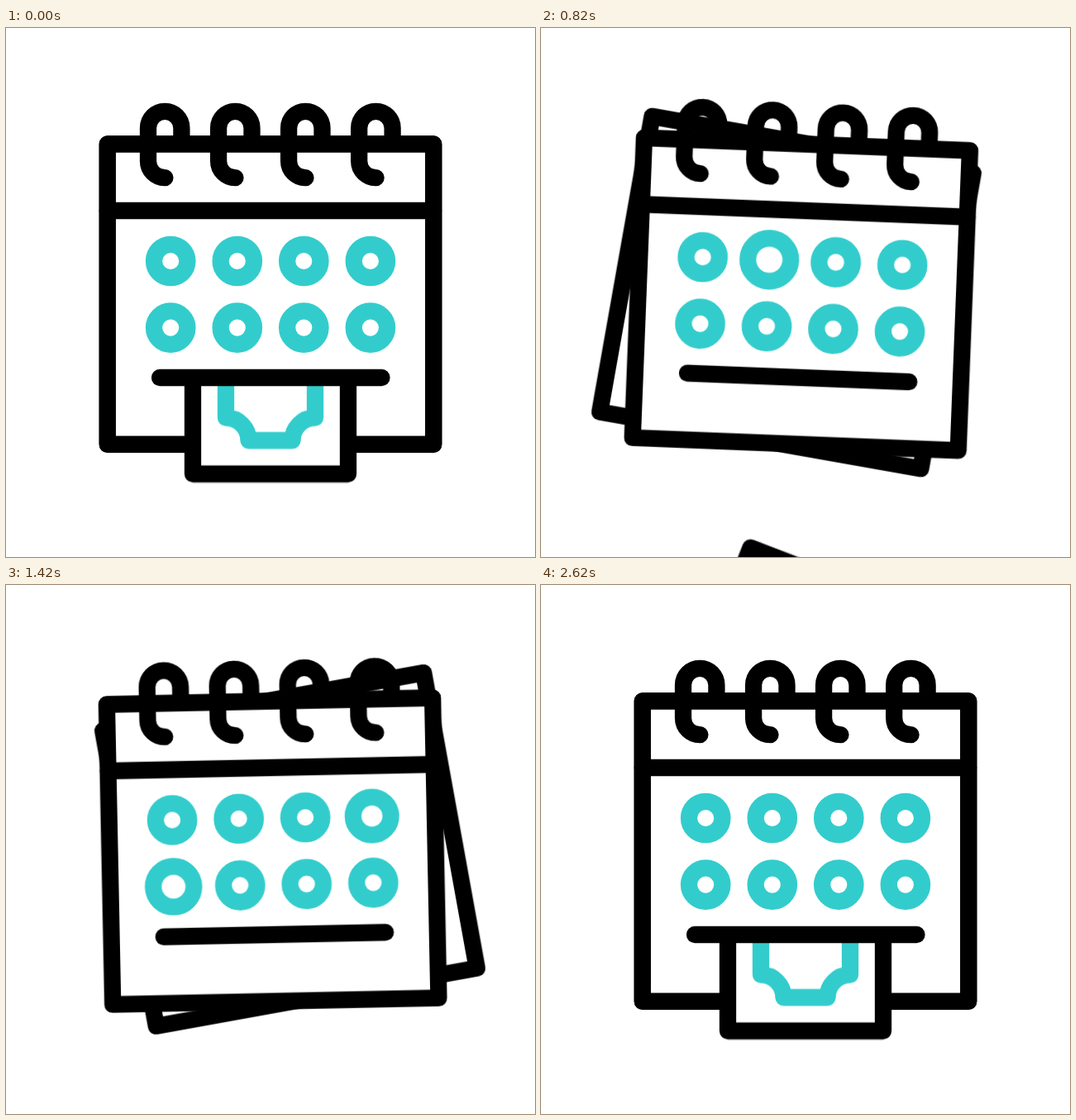
An HTML page for the animation above (3 s loop, 640 px wide and 640 px high).

```html
<!DOCTYPE html>
<html lang="en">
<head>
<meta charset="utf-8">
<title>Calendar and ticket</title>
<style>
  html, body { margin: 0; width: 100%; height: 100%; overflow: hidden; background: #fff; }
  svg { display: block; width: 100vw; height: 100vh; }

  .ink, .teal {
    fill: none;
    stroke: #000;
    stroke-width: 20.3;
    stroke-linecap: round;
    stroke-linejoin: round;
  }
  .teal { stroke: #3cc; }
  .paper { fill: #fff; }

  .front, .back { transform-origin: 320px 190px; }
  .front { animation: sway 3s ease-in-out infinite; }
  .back { animation: swing 3s ease-in-out infinite; }
  .ticket { animation: feed 3s ease-in-out infinite; }
  .dots circle {
    r: 20.2px;
    animation: pulse 3s ease-in-out calc(var(--i) * 250ms) infinite;
  }

  @keyframes sway {
    0%, 6.667% { transform: rotate(0deg); }
    23.333% { transform: rotate(3.1deg); }
    40% { transform: rotate(-4deg); }
    56.667% { transform: rotate(3.1deg); }
    73.333%, 100% { transform: rotate(0deg); }
  }
  @keyframes swing {
    0%, 6.667% { transform: rotate(0deg); }
    26.667% { transform: rotate(10.1deg); }
    45.167% { transform: rotate(-11.1deg); }
    60% { transform: rotate(8.2deg); }
    73.333%, 100% { transform: rotate(0deg); }
  }
  /* The ticket drops out of the slot, then a new one slides in. */
  @keyframes feed {
    0% { transform: translate(320px, 416.5px) rotate(0deg); }
    6.667% { transform: translate(320px, 416.5px) rotate(0deg); animation-timing-function: ease-in; }
    28.667%, 53.99% { transform: translate(320px, 816.5px) rotate(20.8deg); }
    54% { transform: translate(320px, 300px) rotate(0deg); }
    73.5% { transform: translate(320px, 449.5px) rotate(0deg); }
    86.667%, 100% { transform: translate(320px, 416.5px) rotate(0deg); }
  }
  @keyframes pulse {
    0%, 10% { r: 20.2px; }
    16.667% { r: var(--peak, 26.7px); }
    27%, 100% { r: 20.2px; }
  }
</style>
</head>
<body>
<svg viewBox="0 0 640 640">
  <defs>
    <rect id="page" x="122.8" y="140.5" width="394.4" height="363.2"/>
    <path id="ring" d="M20 139V121a20.2 20.2 0 0 0-40.4 0v40a20.2 20.2 0 0 0 20.4 20.2"/>
    <clipPath id="below"><rect x="-400" y="423" width="1440" height="900"/></clipPath>
  </defs>

  <use href="#page" class="ink paper back"/>

  <g class="front">
    <use href="#page" class="ink paper"/>
    <path class="ink" d="M122.8 221H517.2"/>
    <g class="ink">
      <use href="#ring" x="192.4"/>
      <use href="#ring" x="277.5"/>
      <use href="#ring" x="362.5"/>
      <use href="#ring" x="447.6"/>
    </g>
    <g class="teal dots">
      <circle cx="199.2" cy="282" style="--i:0"/>
      <circle cx="279.8" cy="282" style="--i:1"/>
      <circle cx="360.3" cy="282" style="--i:2;--peak:24.8px"/>
      <circle cx="440.9" cy="282" style="--i:3"/>
      <circle cx="199.2" cy="362.6" style="--i:4"/>
      <circle cx="279.8" cy="362.6" style="--i:5"/>
      <circle cx="360.3" cy="362.6" style="--i:6"/>
      <circle cx="440.9" cy="362.6" style="--i:7"/>
    </g>
    <g clip-path="url(#below)">
      <g class="ticket">
        <rect class="ink paper" x="-94" y="-123" width="188" height="246"/>
        <path class="teal" d="M-54-55a27.5 27.5 0 0 0 27.5-27.5H26.5a27.5 27.5 0 0 0 27.5 27.5V55a27.5 27.5 0 0 0-27.5 27.5H-26.5a27.5 27.5 0 0 0-27.5-27.5z"/>
      </g>
    </g>
    <path class="ink" d="M186 423H454.5"/>
  </g>
</svg>
</body>
</html>
```
